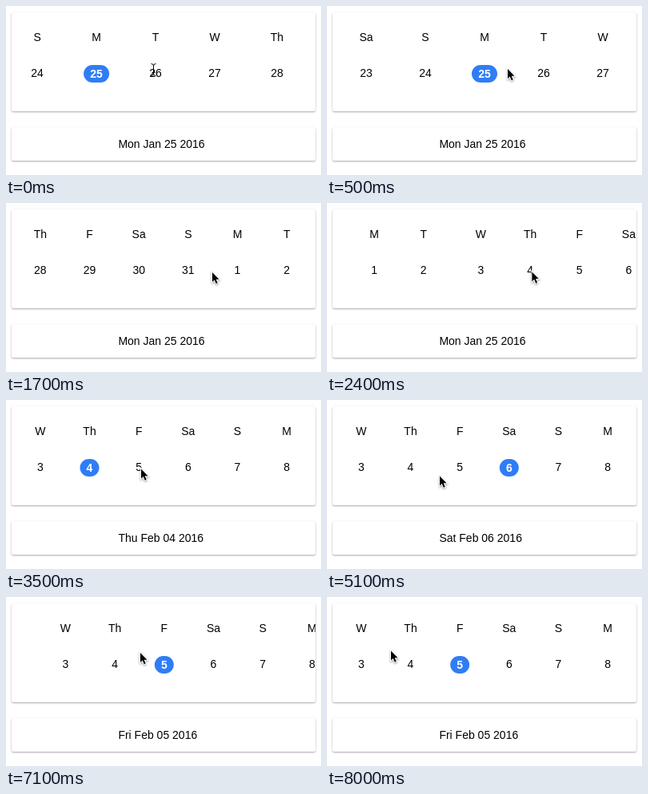
An HTML page that plays this animation: 394x212 px, repeating every 8100 ms.

```html
<!DOCTYPE html>
<html lang="en">
<head>
<meta charset="utf-8">
<title>Date strip</title>
<style>
  html, body { margin: 0; height: 100%; overflow: hidden; background: #fff; }
  .card {
    position: absolute; left: 7px; width: 380px; border-radius: 2px; background: #fff;
    box-shadow: 0 1px 3px rgba(0,0,0,.12), 0 1px 2px rgba(0,0,0,.24);
  }
  svg { position: absolute; left: 0; top: 0; font: 14px "Liberation Sans", Arial, sans-serif; }
  .cell { text-anchor: middle; }
  rect { fill: none; }
  .on rect { fill: #2f7df6; }
  .on .num { fill: #fff; font-weight: bold; transform: translateY(1px); }
  #arrow { stroke: #fff; stroke-width: 2; paint-order: stroke; filter: drop-shadow(0 1px 1px rgba(0,0,0,.4)); }
  #beam { fill: none; stroke: #000; }
</style>
</head>
<body>
<div class="card" style="top:8px;height:124px"></div>
<div class="card" style="top:152px;height:42px"></div>
<svg width="394" height="212">
  <clipPath id="clip"><path d="M7 8H387V132H7z"/></clipPath>
  <g clip-path="url(#clip)"><g id="strip"></g></g>
  <text id="label" x="140.4" y="178"></text>
  <path id="arrow" d="M0 0V12L2.7 9.4L4.8 14.3L6.7 13.5L4.7 8.7H8.5z"/>
  <path id="beam" d="M-3 -7.5Q0 -7.5 0 -5V5Q0 7.5 -3 7.5M3 -7.5Q0 -7.5 0 -5M0 5Q0 7.5 3 7.5M-2 3.5H2"/>
</svg>
<script>
const TICK = 100, TICKS = 81, PAGE = 380;
const $ = id => document.getElementById(id);

const pages = [
  ['Sa 23', 'S 24', 'M 25', 'T 26', 'W 27'],
  ['Th 28', 'F 29', 'Sa 30', 'S 31', 'M 1', 'T 2'],
  ['W 3', 'Th 4', 'F 5', 'Sa 6', 'S 7', 'M 8']
];

// All times are in ticks: [from, day, label]
const picks = [
  [0, '25', 'Mon Jan 25 2016'],
  [30, '4', 'Thu Feb 04 2016'],
  [42, '6', 'Sat Feb 06 2016'],
  [64, '5', 'Fri Feb 05 2016']
];

// Rests of the strip, [from, to, page]; it glides between them
const scroll = [[-1, -1, .298], [2, 9, 0], [16, 20, 1], [27, 70, 2], [73.5, 73.5, 1.58], [79, 81, 2]];

// Rests of the pointer, [from, to, x, y, 1 for a text cursor]
const pointer = [
  [0, 0, 184.5, 80, 1], [5, 5, 226, 79, 0], [9, 9, 335, 76, 0], [14, 14, 185, 86, 0],
  [17, 18, 258, 87, 0], [21, 21, 355, 86, 0], [28, 34, 104.5, 87, 1], [35, 35, 169, 86.5, 0],
  [40, 46, 228.5, 82, 1], [51, 51, 141, 95.5, 0], [55, 55, 113, 88, 0], [61, 65, 167.5, 86, 1],
  [69, 70, 69, 74, 0], [71, 71, 168, 70, 0], [74, 74, 264, 69, 0], [80, 81, 80, 67.5, 0]
];

function at(rests, t) {
  const i = rests.findLastIndex(r => r[0] <= t);
  const [, end, ...pose] = rests[i];
  if (t <= end) return pose;
  const [next, , ...goal] = rests[i + 1];
  const p = (t - end) / (next - end), ease = p * p * (3 - 2 * p);
  return pose.map((v, j) => v + (goal[j] - v) * ease);
}

$('strip').innerHTML = pages.map((days, p) => days.map((d, i) => {
  const [name, num] = d.split(' ');
  const x = 12 + p * PAGE + (i + .5) * 370 / days.length;
  const w = 16 + 8 * num.length;
  return `<g class="cell" data-day="${num}"><rect x="${x - w / 2}" y="74" width="${w}" height="22" rx="11"/>
    <text x="${x}" y="44">${name}</text><text class="num" x="${x}" y="89">${num}</text></g>`;
}).join('')).join('');
const cells = document.querySelectorAll('.cell');

function draw(t) {
  const [, day, text] = picks.findLast(p => p[0] <= t);
  const [page] = at(scroll, t);
  const [x, y, beam] = at(pointer, t);

  $('strip').setAttribute('transform', `translate(${-page * PAGE})`);
  cells.forEach(c => c.classList.toggle('on', c.dataset.day === day));
  $('label').textContent = text;
  for (const id of ['arrow', 'beam']) {
    $(id).setAttribute('transform', `translate(${x} ${y})`);
    $(id).style.display = (id === 'beam') === (beam === 1) ? '' : 'none';
  }
}

const start = performance.now();
function run() {
  draw(Math.floor((performance.now() - start) / TICK) % TICKS);
  requestAnimationFrame(run);
}
run();
</script>
</body>
</html>
```
